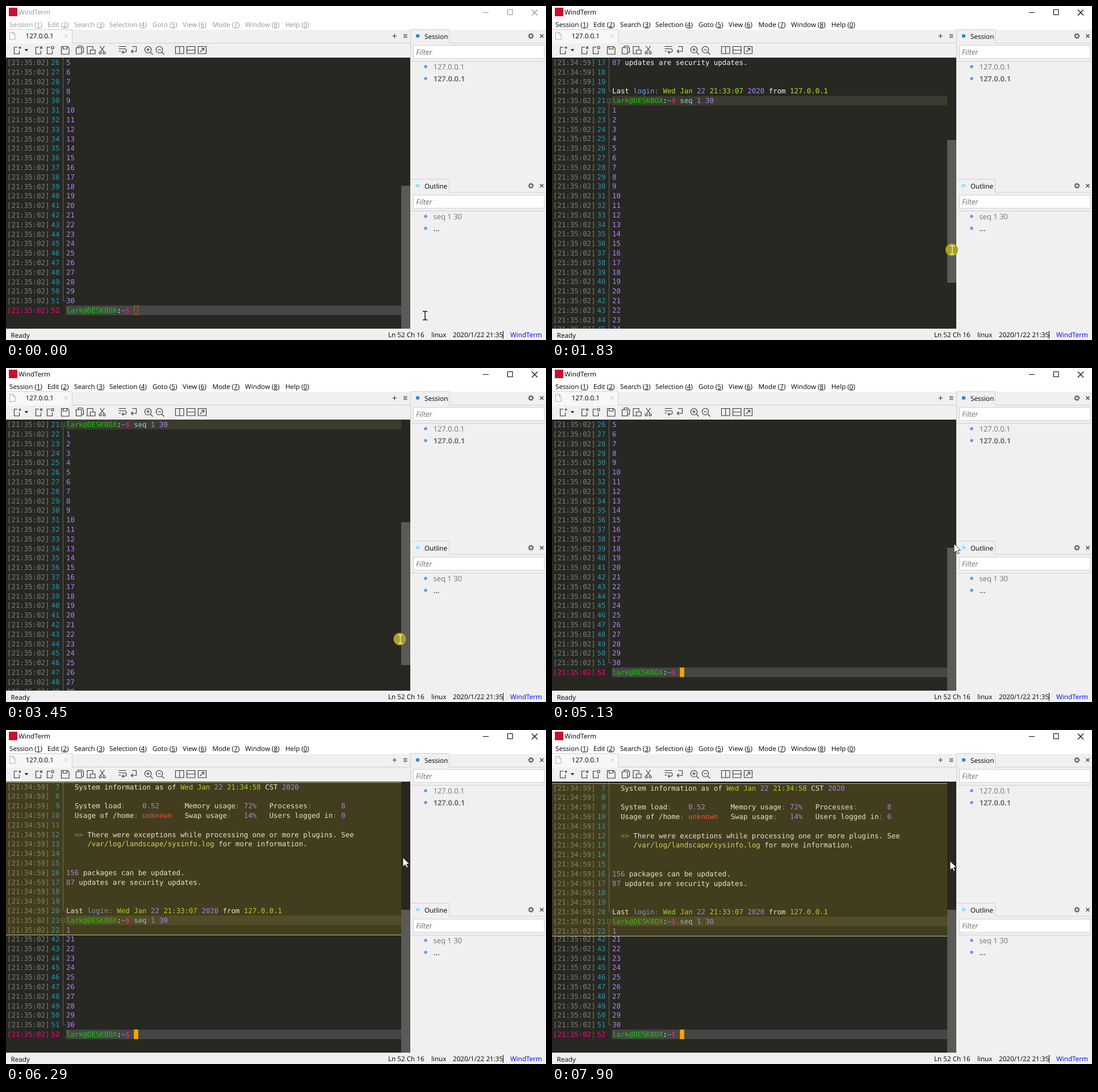
Write an HTML page that moves like this. It is 951x589 px and loops after 8000 ms.

```html
<!DOCTYPE html>
<html lang="en">
<head>
<meta charset="utf-8">
<title>Terminal</title>
<style>
html, body { margin: 0; width: 100%; height: 100%; overflow: hidden; background: #f0f0f0; }
#stage { display: block; width: 951px; height: 589px; }
text { white-space: pre; text-rendering: geometricPrecision; font: 11.7px "Open Sans", "Noto Sans", sans-serif; }
#rows text { font: 12.386px "DejaVu Sans Mono", "Liberation Mono", monospace; fill: #f8f8f2; }
#rows .time { fill: #7f7f78; }
#rows .num { fill: #2b91af; text-anchor: end; }
#rows .now { fill: #ff0080; }
.p { fill: #ae81ff; } .c { fill: #66d9ef; } .g { fill: #a6e22e; } .d { fill: #8a8a7c; }
.r { fill: #f4473c; } .y { fill: #e6db74; } .b { fill: #6a9ee0; } .u { fill: #16c60c; }
.k { fill: #f92672; } .s { fill: #86cdf5; }
.ico { fill: none; stroke: #333; stroke-width: 1.1; }
.line { fill: none; stroke: #d0d0d0; }
#bar { fill: #000; }
#bar .ctl { fill: none; stroke: #000; stroke-width: 1.1; }
.off #bar { fill: #959595; }
.off #bar .ctl { stroke: #959595; }
#block { fill: #ffa500; stroke: #ffa500; }
.off #block { fill: none; stroke: #b5651d; }
</style>
</head>
<body>
<svg id="stage" viewBox="0 0 951 589">
  <rect width="951" height="589" fill="#f0f0f0"/>
  <rect width="951" height="42" fill="#fff"/>
  <rect x="5" y="3" width="15" height="15" fill="#c8102e"/>
  <g id="bar">
    <path class="ctl" d="M840 11.500h10M883.500 6.500h8.500v9h-8.500zM926 6.500l10 10m0-10l-10 10"/>
  </g>

  <rect y="42" width="116" height="24" fill="#f7f7f7"/>
  <path class="line" d="M0 41.500H116.500V65.500H712.500M712.500 91V41.500H780.500V65.500H951M713 305.500H780.500V328.500H951M713 97.500H951M713 361.500H951"/>
  <path d="M6.500 46.500h6l3.500 3.500v9h-9.500zm6 0v3.500h3.500" fill="#fff" stroke="#aaa"/>
  <path d="M103 50l6 6m0-6l-6 6" stroke="#c4c4c4"/>
  <path class="ico" d="M680.500 53h7.500m-3.750-3.750v7.500M700 50.500h6.500m-6.500 2.500h6.500m-6.500 2.500h6.500"/>

  <g class="ico">
    <path d="M20 72.500h-5.500v12h9v-6M22 73.500h5m-2.500-2.500v5"/>
    <path d="M32.500 76h7l-3.500 4z" fill="#333" stroke="none"/>
    <path d="M58 72.500h-5.500v12h9v-6M60 71.500l4 4m0-4l-4 4"/>
    <path d="M78 72.500h-5.500v12h9v-6"/><circle cx="82" cy="73.500" r="2.200"/>
    <path d="M97.500 71.500h11l2.500 2.500v11h-13.500zM100.500 71.500v4.500h7v-4.500"/>
    <path d="M127 73.500v-3h6.500l3 3v8.500h-3M123.500 73.500h9.500v11h-9.500z"/>
    <path d="M147.500 84.500h-4.500v-13h10v5M148.500 77.500h8.500v7h-8.500z"/>
    <path d="M165.500 70.500l7 10m1-10l-7 10"/><circle cx="166" cy="82.500" r="2"/><circle cx="173" cy="82.500" r="2"/>
    <path d="M198.500 71.500h13M198.500 75.500h11q2.500 0 2.500 3t-2.500 3h-5m2.500-2.500l-2.500 2.500l2.500 2.500M198.500 79.500h4"/>
    <path d="M222 71.500h7.500v8.500h-9m3-3l-3 3l3 3"/>
    <circle cx="250" cy="77" r="5.700"/><path d="M247 77h6m-3-3v6m4.500 1.500l4 4"/>
    <circle cx="270" cy="77" r="5.700"/><path d="M267 77h6m1.500 4.500l4 4"/>
    <path d="M298.500 71.500h14.500v12.500h-14.500zm7.250 0v12.500"/>
    <path d="M318.500 71.500h14.500v12.500h-14.500zm0 6.250h14.500"/>
    <path d="M338.500 71.500h14v12.500h-14zM342 81l6.500-6.500m-4.500 0h4.500v4.500"/>
  </g>

  <g id="panels"></g>
  <g id="labels"></g>
  <path d="M875.500 573v14" stroke="#000"/>

  <svg id="term" y="91" width="712" height="478">
    <rect width="712" height="478" fill="#272822"/>
    <rect id="thumb" x="696" width="16" height="252" fill="#5a5a56"/>
    <g id="main"><g id="rows"></g></g>
    <svg id="peek" width="696" height="270">
      <rect width="696" height="270" fill="#272822"/>
      <use id="peekRows" href="#rows"/>
      <rect width="696" height="270" fill="rgb(174,145,19)" opacity=".2"/>
      <path d="M0 .5H696M0 269.500H696" stroke="#c6bd8c"/>
    </svg>
  </svg>

  <g id="mouse">
    <circle id="halo" cx="-1" cy="0" r="11" fill="#a8a21e"/>
    <path id="beam" d="M-4-7.500h3l1 1l1-1h3M0-6.500v13M-4 7.500h3l1-1l1 1h3" fill="none" stroke-width="1.400"/>
    <path id="arrow" d="M0 0V16L4 12.500L6.500 18L9 17L6.500 11.500H11.500Z" fill="#fff" stroke="#222" stroke-width=".9"/>
  </g>
</svg>
<script>
const $ = id => document.getElementById(id);
const ROW = 16.8, COL = 7.457, LEFT = 106, LAST = 52, MAX = 25, TOP = 91;

function add(parent, tag, attrs, text) {
  const el = document.createElementNS('http://www.w3.org/2000/svg', tag);
  for (const k in attrs) el.setAttribute(k, attrs[k]);
  if (text !== undefined) el.textContent = text;
  parent.appendChild(el);
  return el;
}
const label = (parent, x, y, text, style = '') => add(parent, 'text', { x, y, style }, text);

// Title and menu
label($('bar'), 22, 15, 'WindTerm');
const menus = { Session: 6, Edit: 73, Search: 120, Selection: 182, Goto: 258, View: 311, Mode: 363.5, Window: 421, Help: 492 };
Object.entries(menus).forEach(([name, x], i) => {
  const t = label($('bar'), x, 37, name + ' (');
  add(t, 'tspan', { 'text-decoration': 'underline' }, i < 8 ? i + 1 : 0);
  add(t, 'tspan', {}, ')');
});

// Tab and status bar
const labels = $('labels');
label(labels, 34.5, 57, '127.0.0.1');
label(labels, 8.5, 584.5, 'Ready');
label(labels, 673, 584, 'Ln 52 Ch 16');
label(labels, 749, 584, 'linux');
label(labels, 787, 584, '2020/1/22 21:35');
label(labels, 888, 584, 'WindTerm', 'fill:#00f');

// Side panels
function panel(y, name, color, items) {
  const g = add($('panels'), 'g', { transform: `translate(0 ${y})` });
  add(g, 'rect', { x: 722, y: -3, width: 6, height: 5.5, fill: color });
  label(g, 737, 4.5, name);
  add(g, 'circle', { class: 'ico', cx: 924.5, cy: 0, r: 2.9 });
  add(g, 'circle', { class: 'ico', cx: 924.5, cy: 0, r: 4.2, 'stroke-dasharray': '1.4 1.9', style: 'stroke-width:1.6' });
  add(g, 'path', { class: 'ico', d: 'M940.500-3l6 6m0-6l-6 6' });
  add(g, 'rect', { class: 'line', x: 717.5, y: 16.5, width: 230.5, height: 23, style: 'fill:#fff' });
  label(g, 722, 32.5, 'Filter', 'font-size:13px;font-style:italic;fill:#707070');
  items.forEach(([text, weight], i) => {
    add(g, 'circle', { cx: 739, cy: 54 + i * 21, r: 2.7, fill: '#5f9ae6' });
    label(g, 752.5, 59 + i * 21, text, `font-size:13px;fill:#757575;font-weight:${weight}`);
  });
}
panel(53, 'Session', '#2f86e0', [['127.0.0.1', 400], ['127.0.0.1', 700]]);
panel(317, 'Outline', '#9be0f8', [['seq 1 30', 400], ['...', 700]]);

// Terminal text: {class:text} marks a coloured run
const prompt = '{u:lark@DESKBOX}:{b:~}{k:$} ';
const lines = [
  'Welcome to Ubuntu {p:18.04.2} LTS {d:(}GNU/Linux 4.4.0{d:-}18362{d:-}Microsoft x86_64{d:)}',
  '',
  ' {d:*} Documentation{d::}  {c:https://help.ubuntu.com}',
  ' {d:*} Management{d::}     {c:https://landscape.canonical.com}',
  ' {d:*} Support{d::}        {c:https://ubuntu.com/advantage}',
  '',
  '  System information as of {g:Wed Jan} {p:22} {g:21:34:58} CST {p:2020}',
  '',
  '  System load{d::}    {p:0.52}      Memory usage{d::} {p:72%}   Processes{d::}       {p:8}',
  '  Usage of /home{d::} {r:unknown}   Swap usage{d::}   {p:14%}   Users logged in{d::} {p:0}',
  '',
  '  {d:=>} There were exceptions while processing one or more plugins. See',
  '     {y:/var/log/landscape/sysinfo.log} for more information.',
  '', '',
  '{p:156} packages can be updated.',
  '{p:87} updates are security updates.',
  '', '',
  'Last {b:login}{d::} {g:Wed Jan} {p:22} {g:21:33:07} {p:2020} from {g:127.0.0.1}',
  prompt + '{s:seq} {p:1 30}',
  ...Array.from({ length: 30 }, (_, i) => `{p:${i + 1}}`),
  prompt
];
const rows = $('rows');
lines.forEach((line, i) => {
  const n = i + 1, top = i * ROW, y = top + 12.6, now = n === LAST ? ' now' : '';
  if (n === 21 || now) {
    add(rows, 'rect', { x: LEFT - .5, y: top, width: 590.5, height: ROW, fill: now ? '#464646' : '#3c3b2f' });
  }
  add(rows, 'text', { class: 'time' + now, x: 2, y }, n < 21 ? '[21:34:59]' : '[21:35:02]');
  add(rows, 'text', { class: 'num' + now, x: 94.5, y }, n);
  const t = add(rows, 'text', { x: LEFT, y });
  for (const [, cls, run, plain] of line.matchAll(/\{(\w):([^}]*)\}|([^{]+)/g)) {
    add(t, 'tspan', cls ? { class: cls } : {}, run ?? plain);
  }
});
add(rows, 'rect', { id: 'block', x: LEFT + 16 * COL + .5, y: 51 * ROW + .5, width: 6.5, height: ROW - 1 });

function fold(from, to) {
  const y = (from - .5) * ROW;
  add(rows, 'path', {
    d: `M97 ${y - 3.5}h7v7h-7zm1.500 3.500h4M100.500 ${y + 3.5}V${(to - .5) * ROW}h4.500`,
    fill: 'none', stroke: '#66665c'
  });
}
fold(1, 20);
fold(21, 51);

// Pointer steps: time, x, y, kind (i = beam, h = dragging, a = arrow)
const steps = [
  [0, 738, 546, 'i'], [200, 720, 532, 'i'], [450, 702, 518, 'i'],
  [850, 704, 514, 'i'], [1050, 705, 512, 'i'], [1240, 705.5, 511, 'h'], [1640, 705, 470, 'h'],
  [1830, 705, 430, 'h'], [2020, 705, 366, 'h'], [2210, 705, 310, 'h'], [2480, 705, 255, 'h'],
  [2670, 706, 266, 'h'], [2870, 705, 334, 'h'], [3060, 702, 379, 'h'], [3260, 698, 433, 'h'],
  [3450, 694.5, 478, 'h'], [3630, 697, 523, 'h'], [3840, 704, 561, 'h'], [4060, 703, 540, 'i'],
  [4270, 702, 480, 'a'], [4470, 702, 425, 'a'], [4680, 705, 395, 'a'], [4900, 710, 350, 'a'],
  [5130, 708, 310, 'a'], [5680, 706, 290, 'a'], [5890, 704, 268, 'a'], [6090, 701, 246, 'a'],
  [6290, 699, 225, 'a'], [6470, 700, 190, 'a'], [6680, 700, 140, 'a'], [6880, 700, 117, 'a'],
  [7090, 700, 136, 'a'], [7290, 700, 172, 'a'], [7580, 700, 196, 'a'], [7740, 700, 216, 'a'],
  [7900, 701, 231, 'a']
];
const clamp = (v, lo, hi) => Math.min(hi, Math.max(lo, v));
const show = (id, on) => $(id).setAttribute('visibility', on ? 'visible' : 'hidden');
const move = (id, x, y) => $(id).setAttribute('transform', `translate(${x} ${y})`);

function draw(t) {
  const [, x, y, kind] = steps.findLast(s => s[0] <= t);
  const grip = t < 2480 ? 286 : 298;
  const scroll = kind === 'h' ? clamp(Math.round((y - grip) / 9), 0, MAX) : MAX;
  $('stage').classList.toggle('off', t < 1240);
  move('main', 0, .5 - scroll * ROW);
  $('thumb').setAttribute('y', scroll * 9 + 1);

  const peek = t >= 5290;
  show('peek', peek);
  if (peek) {
    const first = Math.max(1, Math.round((y - TOP) / 477 * LAST - 7.9));
    $('peek').setAttribute('y', Math.max(1, y - 137 - TOP));
    move('peekRows', 0, (1 - first) * ROW);
  }

  move('mouse', x, y);
  show('halo', kind === 'h');
  show('beam', kind !== 'a');
  show('arrow', kind === 'a');
  $('beam').setAttribute('stroke', x > 712 ? '#111' : '#f3f0c8');
}

function tick() {
  draw(performance.now() % 8000);
  requestAnimationFrame(tick);
}
tick();
</script>
</body>
</html>
```
